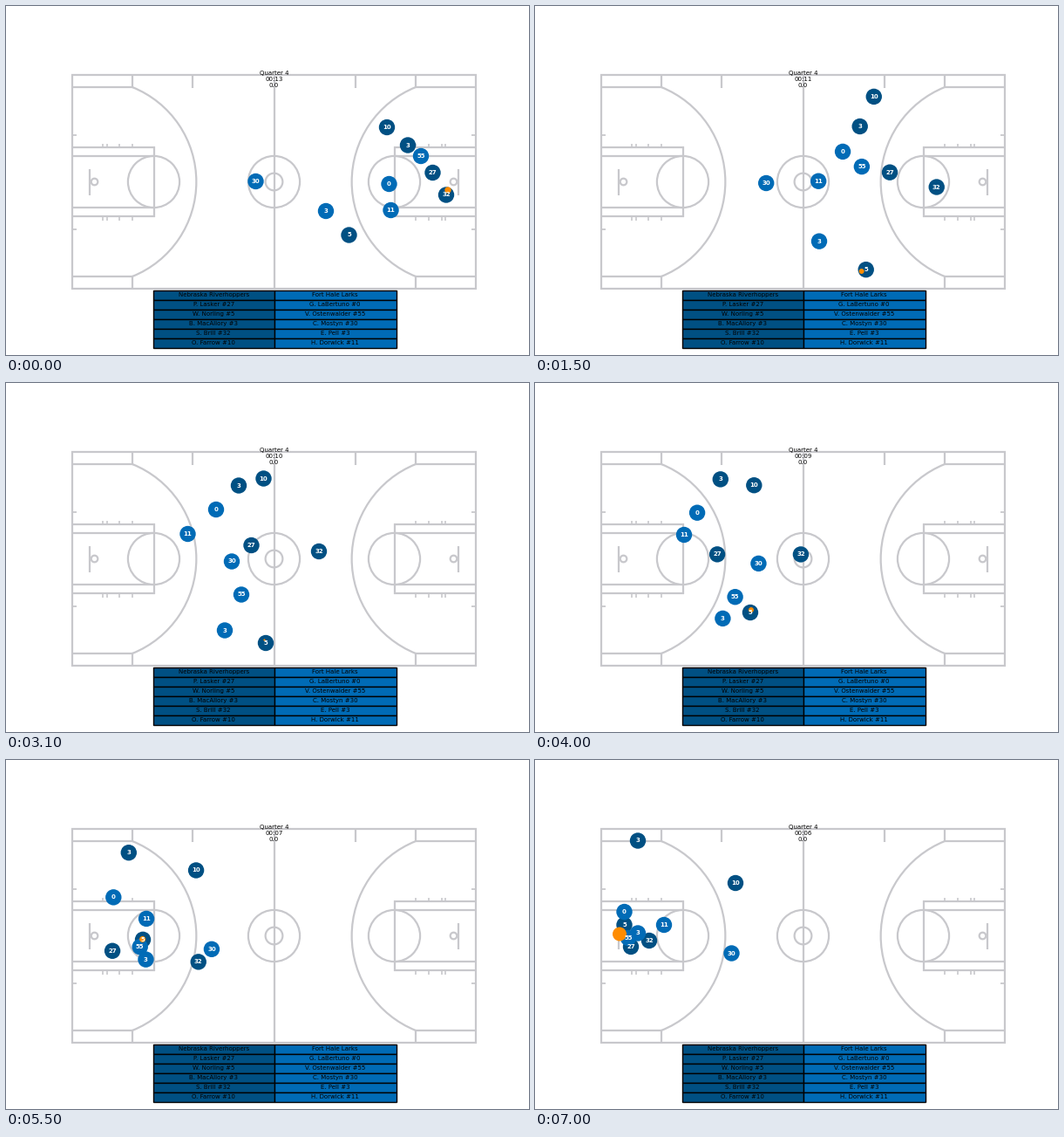
These frames come from a looping animation (600 by 400 pixels, 7100 ms). A matplotlib script:

```python
import matplotlib.pyplot as plt
import numpy as np
from matplotlib.animation import FuncAnimation
from matplotlib.patches import Arc, Circle, Rectangle

W, H, DPI = 600, 400, 100
FRAMES, INTERVAL = 71, 100
LINE = "#c8c8cc"
DARK, LIGHT, ORANGE = "#005083", "#006bb6", "#ff8c00"
FONT = 5
MID_X, MID_Y = 307.5, 201.5
FOOT = 4.93

plt.rcParams["font.family"] = "DejaVu Sans"
fig = plt.figure(figsize=(W / DPI, H / DPI), dpi=DPI, facecolor="white")
ax = fig.add_axes([0, 0, 1, 1])
ax.set_xlim(0, W)
ax.set_ylim(H, 0)
ax.axis("off")


def line(x0, y0, x1, y1, width=1.6):
    ax.plot([x0, x1], [y0, y1], color=LINE, lw=width,
            solid_capstyle="butt", zorder=1)


def ring(x, y, r):
    ax.add_patch(Circle((x, y), r, fill=False, ec=LINE, lw=1.6, zorder=1))


def box(x0, y0, x1, y1):
    ax.add_patch(Rectangle((x0, y0), x1 - x0, y1 - y0, fill=False,
                           ec=LINE, lw=1.6, zorder=1))


def draw_half(flip):
    def fx(x):
        return 2 * MID_X - x if flip else x

    hoop, lane = fx(101.5), fx(169.5)
    for y in (162, 241):
        line(fx(76), y, fx(170.5), y)
    for y in (172, 231):
        line(fx(76), y, lane, y)
    line(lane, 161, lane, 242)
    ring(lane, MID_Y, 6 * FOOT)
    ring(hoop, MID_Y, 3.8)
    line(fx(96), 187, fx(96), 216.5)

    # three-point line: straight corners joined by an arc
    for y0, y1 in ((79, 93.2), (324, 309.8)):
        line(fx(76), y1, fx(145.5), y1)
        line(fx(145), y0, fx(145), y1)
    r = 23.7 * FOOT
    half = np.degrees(np.arctan2(108.3, 43.5))
    turn = 180 if flip else 0
    ax.add_patch(Arc((hoop, MID_Y), 2 * r, 2 * r, theta1=turn - half,
                     theta2=turn + half, ec=LINE, lw=1.6, zorder=1))

    line(fx(214), 79, fx(214), 94)
    for y in (147.5, 255.5):
        line(fx(76), y, fx(81), y, 1.3)
    for x in (111, 115.5, 130, 145):
        line(fx(x), 157.5, fx(x), 161.5, 1.2)
        line(fx(x), 241.5, fx(x), 245.5, 1.2)


def draw_court():
    box(76, 79, 539, 324)
    line(MID_X, 79, MID_X, 324)
    ring(MID_X, MID_Y, 6 * FOOT)
    ring(MID_X, MID_Y, 2 * FOOT)
    draw_half(False)
    draw_half(True)


def draw_table():
    left = ["Nebraska Riverhoppers", "P. Lasker #27", "W. Norling #5",
            "B. MacAllory #3", "S. Brill #32", "O. Farrow #10"]
    right = ["Fort Hale Larks", "G. LaBertuno #0", "V. Ostenwalder #55",
             "C. Mostyn #30", "E. Pell #3", "H. Dorwick #11"]
    cw, rh = 139.5, 11.08
    for col, (names, color) in enumerate(((left, DARK), (right, LIGHT))):
        for row, name in enumerate(names):
            x, y = 168.5 + col * cw, 325.5 + row * rh
            ax.add_patch(Rectangle((x, y), cw, rh, fc=color, ec="black",
                                   lw=1, zorder=2))
            ax.text(x + cw / 2, y + rh / 2, name, size=FONT, color="black",
                    ha="center", va="center", zorder=3)


# Player positions at these frames; motion between them is a smooth curve.
KEYS = [0, 8, 22, 31, 49, 62, 70]
DARK_TEAM = {
    27: [(489.5, 191), (453, 190.5), (353.5, 190), (281.5, 186),
         (149, 211), (105, 223), (110, 214)],
    5: [(393.5, 262.5), (387, 291), (359.5, 304), (298, 298),
        (198, 222.5), (117, 193), (102.5, 189)],
    3: [(461, 159.5), (418, 147), (325, 129.5), (267, 117.5),
        (166.5, 106.5), (120.5, 104), (118, 92.5)],
    32: [(505, 216.5), (492, 213), (418.5, 201), (359, 193),
         (254, 212), (179, 229.5), (131, 207)],
    10: [(437, 139), (422, 110.5), (347, 106), (295.5, 109.5),
         (222.5, 125), (221.5, 129.5), (230, 141)],
}
LIGHT_TEAM = {
    0: [(439.5, 204), (400.5, 189), (301.5, 148), (241, 145),
        (142.5, 155), (109, 162), (102.5, 174)],
    55: [(476, 172), (429, 177), (321, 200), (270, 242.5),
         (190, 228), (118, 201), (107, 204)],
    30: [(286.5, 201), (277, 199.5), (256.5, 206.5), (259, 204.5),
         (248, 212), (224, 221.5), (225.5, 221.5)],
    3: [(367, 235), (345, 250), (301, 285), (251, 283.5),
        (185, 248), (135, 208), (118, 198.5)],
    11: [(441.5, 234), (385.5, 215), (266, 188), (208.5, 173),
         (164, 180), (157, 184), (148, 189)],
}
EXTRA = {11: (40, (171, 174)), 32: (56, (215, 233))}


def smooth_path(number, points):
    """Cubic Hermite curve through the key points, one row per frame."""
    keys = list(zip(KEYS, points))
    if number in EXTRA:
        keys = sorted(keys + [EXTRA[number]])
    t = np.array([k for k, _ in keys], float)
    p = np.array([q for _, q in keys], float)
    slope = np.gradient(p, t, axis=0)
    f = np.arange(FRAMES)
    i = np.clip(np.searchsorted(t, f, side="right") - 1, 0, len(t) - 2)
    h = (t[i + 1] - t[i])[:, None]
    u = (f - t[i])[:, None] / h
    return ((1 + 2 * u) * (1 - u) ** 2 * p[i] + u * (1 - u) ** 2 * h * slope[i]
            + u ** 2 * (3 - 2 * u) * p[i + 1]
            + u ** 2 * (u - 1) * h * slope[i + 1])


def interp_xy(f, t, points):
    xs, ys = zip(*points)
    return np.array([np.interp(f, t, xs), np.interp(f, t, ys)])


CATCH, SHOT = 14, 62


def ball_state(f, handler):
    """Ball centre and radius; the radius grows with height."""
    if f < CATCH:
        t = [0, 6.5, 8, CATCH]
        pos = interp_xy(f, t, [(507, 211), (498, 212), (474.5, 228.7),
                               handler[CATCH] + (-5, 2)])
        return pos, np.interp(f, t, [3.7, 4.5, 4.8, 3.5])
    if f < SHOT:
        pos = handler[f] + interp_xy(
            f, [CATCH, 22, 31, 49, SHOT],
            [(-5, 2), (-5.5, 1), (-1.5, -3.5), (3.5, -2.5), (-5, 2)])
        bounce = 1.1 + 2.4 * abs(np.sin(np.pi * (f - 31) / 7))
        return pos, np.interp(f, [54, SHOT], [bounce, 4])
    t = [SHOT, 67, 70]
    pos = interp_xy(f, t, [(112, 195), (98.5, 198.5), (97, 199.5)])
    return pos, np.interp(f, t, [4, 8.2, 8])


draw_court()
draw_table()

players = []
for team, color in ((DARK_TEAM, DARK), (LIGHT_TEAM, LIGHT)):
    for number, points in team.items():
        disc = ax.add_patch(Circle(points[0], 9.2, fc=color, lw=0, zorder=4))
        label = ax.text(*points[0], str(number), size=FONT, color="white",
                        weight="bold", ha="center", va="center", zorder=6)
        players.append((disc, label, smooth_path(number, points)))
ball_handler = players[1][2]
ball = ax.add_patch(Circle((0, 0), 4, fc=ORANGE, lw=0, zorder=5))

header = [ax.text(MID_X, y, s, size=FONT, color="black", ha="center",
                  va="baseline", zorder=3)
          for y, s in ((79, "Quarter 4"), (86, ""), (93, "0.0"))]
clock = header[1]


def update(f):
    clock.set_text(f"00:{13 - (f + 6) // 10:02d}")
    for disc, label, path in players:
        disc.center = path[f]
        label.set_position(path[f])
    ball.center, ball.radius = ball_state(f, ball_handler)
    return []


anim = FuncAnimation(fig, update, frames=FRAMES, interval=INTERVAL,
                     repeat=True, repeat_delay=0)
plt.show()
```
